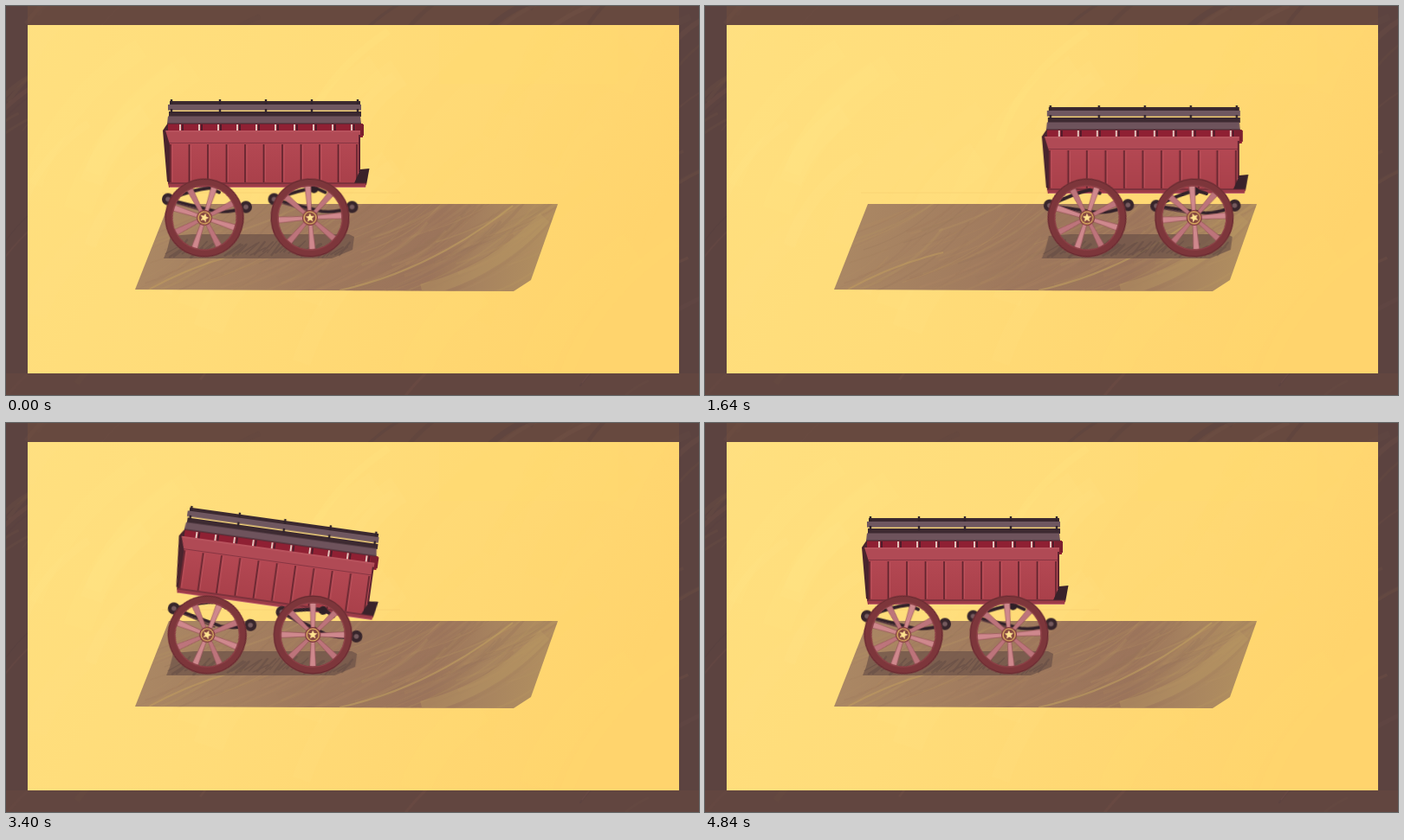
Recreate the animation shown at these times as an HTML page. Size 800 px wide and 450 px high, loop 4880 ms.

```html
<!DOCTYPE html>
<html lang="en">
<head>
<meta charset="utf-8">
<title>Wagon</title>
<style>
html, body { margin: 0; width: 100%; height: 100%; overflow: hidden; background: #ffdc78; }
svg { display: block; width: 100%; height: 100%; }

.ride, .roll, .tilt, .rear, .fore, .lag { animation: 4880ms ease-in-out infinite; }
.ride { --k: 1; animation-name: ride; }
.ride.front { --k: 1.008; }
.ride.low { --k: .975; }
.ride.top { --k: .98; }
.roll { animation-name: roll; }
.tilt { animation-name: tilt; transform-origin: 300px 320px; }
.rear { animation-name: rear; }
.fore { animation-name: fore; }
.lag { animation-name: lag; }

/* distance driven, scaled by --k */
@keyframes ride {
  0%, .5% { transform: translateX(0); animation-timing-function: cubic-bezier(.65,0,.35,1); }
  18.4%, 21% { transform: translateX(calc(var(--k) * 216px)); }
  33.6% { transform: translateX(calc(var(--k) * 212px)); }
  53.28% { transform: translateX(calc(var(--k) * 211px)); animation-timing-function: cubic-bezier(.65,0,.35,1); }
  73.36% { transform: translateX(calc(var(--k) * -4px)); }
  86%, 100% { transform: translateX(0); }
}
/* the same distance over a 45px radius */
@keyframes roll {
  0%, .5% { transform: rotate(0deg); animation-timing-function: cubic-bezier(.65,0,.35,1); }
  18.4%, 21% { transform: rotate(275deg); }
  33.6% { transform: rotate(270deg); }
  53.28% { transform: rotate(268.7deg); animation-timing-function: cubic-bezier(.65,0,.35,1); }
  73.36% { transform: rotate(-5deg); }
  86%, 100% { transform: rotate(0deg); }
}
@keyframes tilt {
  0%, .5% { transform: none; animation-timing-function: cubic-bezier(.45,0,.5,1); }
  11.48% { transform: translate(1px,0) rotate(-8.4deg); }
  20% { transform: translate(0,6px) rotate(3deg); }
  23% { transform: translate(0,7px) rotate(1.5deg); }
  28% { transform: translate(0,7px) rotate(-.7deg); }
  33.6%, 53.28% { transform: translate(0,7px) rotate(0deg); }
  68.65% { transform: translate(-5px,0) rotate(9.7deg); animation-timing-function: cubic-bezier(.3,.2,.5,1); }
  69.67% { transform: translate(-10px,1px) rotate(8deg); animation-timing-function: cubic-bezier(.3,.3,.5,1); }
  74.6% { transform: translate(0,0) rotate(-2.3deg); }
  79.5% { transform: translate(0,0) rotate(1deg); }
  84% { transform: translate(0,0) rotate(-.7deg); }
  88%, 100% { transform: none; }
}
@keyframes rear {
  0%, .5% { transform: none; }
  11.48% { transform: translate(-10px,4px) rotate(-34deg); }
  20% { transform: translate(2px,1px) rotate(-2deg); }
  33.6%, 53.28% { transform: translate(-1px,2.5px) rotate(-6deg); }
  69% { transform: translate(3px,-4px) rotate(7deg); }
  74.6% { transform: translate(-2px,1px) rotate(-7deg); }
  79.5% { transform: translate(1px,0) rotate(1deg); }
  86%, 100% { transform: none; }
}
@keyframes fore {
  0%, .5% { transform: none; }
  11.48% { transform: translate(-12px,-3.5px) rotate(-25deg); }
  20% { transform: translate(1px,4px) rotate(-1deg); }
  33.6%, 53.28% { transform: translate(-2px,3px) rotate(-6deg); }
  69% { transform: translate(4px,5px) rotate(13deg); }
  74.6% { transform: translate(-2px,-1px) rotate(-5deg); }
  79.5% { transform: translate(1px,0) rotate(1deg); }
  86%, 100% { transform: none; }
}
@keyframes lag {
  0%, .5%, 33.6%, 100% { transform: none; }
  11.48% { transform: translateX(-8px); }
  20% { transform: translateX(2px); }
}
</style>
</head>
<body>
<svg viewBox="0 0 800 450" preserveAspectRatio="none">
  <defs>
    <linearGradient id="wall" x2="1" y2=".35">
      <stop offset="0" stop-color="#ffe080"/><stop offset=".5" stop-color="#ffdc79"/><stop offset="1" stop-color="#ffd46d"/>
    </linearGradient>
    <linearGradient id="floor" gradientUnits="userSpaceOnUse" x1="160" y1="240" x2="630" y2="340">
      <stop offset="0" stop-color="#ab8864"/><stop offset=".4" stop-color="#9f795d"/>
      <stop offset=".7" stop-color="#9b745b"/><stop offset=".82" stop-color="#a7835f"/><stop offset="1" stop-color="#b39160"/>
    </linearGradient>
    <linearGradient id="side" x2="0" y2="1">
      <stop offset="0" stop-color="#b44853"/><stop offset="1" stop-color="#a9404a"/>
    </linearGradient>
    <clipPath id="ground"><path d="M188 229H637L606 317 586 330 149 328Z"/></clipPath>
    <clipPath id="border"><path d="M0 0H800V450H0ZM25 22V425H777V22Z" clip-rule="evenodd"/></clipPath>
    <g id="spring" fill="none" stroke="#33222a" stroke-width="4" stroke-linecap="round">
      <path d="M-45-4Q-16-15 3-17L14-12"/>
      <path d="M-38-2 10 10Q27 12 45 5" stroke-width="3.6"/>
      <path d="M-38 0 4 12" stroke="#58383f" stroke-width="1.5"/>
      <g fill="#37252b" stroke="none">
        <circle cx="-45" cy="-4" r="7"/><circle cx="45" cy="5" r="7"/>
        <g fill="#755a5e"><circle cx="-45" cy="-4" r="2.8"/><circle cx="45" cy="5" r="2.8"/></g>
      </g>
    </g>
    <g id="wheel">
      <g id="spokes" stroke="#8f4b53" stroke-width=".6"></g>
      <circle r="41" fill="none" stroke="#7d363b" stroke-width="9"/>
      <circle r="44.8" fill="none" stroke="#65282f" stroke-width="1"/>
      <circle r="37.3" fill="none" stroke="#93434a" stroke-width="1"/>
      <circle r="9" fill="#7d343b"/>
      <circle r="7" fill="#85463f" stroke="#deb163" stroke-width="1.3"/>
      <path id="star" fill="#ffe391"/>
    </g>
  </defs>

  <rect width="800" height="450" fill="url(#wall)"/>
  <g id="brush" fill="none"></g>
  <path d="M500 22H707V90H500Z" fill="#ffd970" opacity=".35"/>
  <path d="M180 216H455" stroke="#efc268" stroke-width=".8" opacity=".45"/>

  <g clip-path="url(#ground)">
    <path d="M140 220H650V335H140Z" fill="url(#floor)"/>
    <g id="grain" fill="none"></g>
  </g>

  <g clip-path="url(#border)">
    <path d="M0 0H800V450H0Z" fill="#67493f"/>
    <path d="M0 0H25V450H0ZM777 0H800V450H777Z" fill="#5c4340"/>
    <path d="M0 425H800V450H0Z" fill="#624640"/>
    <g id="wood" fill="none"></g>
  </g>

  <g class="ride low"><g class="lag">
    <path d="M190 266 215 264H396L402 267 400 282 376 292 182 292 186 282Z" fill="#6d5349" opacity=".72"/>
    <g id="hatch" stroke="#513e3c" stroke-linecap="round" fill="none" opacity=".3"></g>
  </g></g>

  <g class="ride top"><g class="tilt">
    <path d="M187 136H412V152H187Z" fill="#8f2033"/>
    <g id="slots"></g>
    <path d="M404 137H413V150H404Z" fill="#7b1f2f"/>
    <path d="M189 110H409V114.500H189Z" fill="#3b2930"/>
    <path d="M187 114H410V120.500H187Z" fill="#72596280"/>
    <path d="M187 114H410V120.500H187Z" fill="#6f5760"/>
    <path d="M188 122H410V128H188Z" fill="#3d2a31"/>
    <path d="M187 127.500H409L410 136H186Z" fill="#6e535c"/>
    <path d="M187 136H410" stroke="#412a32"/>
    <path id="posts" stroke="#32242b" stroke-width="2.400" fill="none"/>
    <path d="M187 157H408V206H187Z" fill="url(#side)"/>
    <g id="panels"></g>
    <path d="M183 144H409V158H184Z" fill="#b04a55"/>
    <path d="M184 145H409" stroke="#bf5b65" stroke-width="1"/>
    <path d="M184 158.500H408" stroke="#873542" stroke-width="1"/>
    <path d="M181 144 187 135V144H184L189 160V205L186 203Z" fill="#49242d"/>
    <path d="M408 149V192" stroke="#5f2430" stroke-width="2"/>
    <path d="M402 205 409 189 419.500 188 416 207Z" fill="#3a222a"/>
    <path d="M187 205H416L415 210H188Z" fill="#9d3c48"/>
    <path d="M187 205H416" stroke="#5b2731" stroke-width="1.200"/>
    <path d="M189 209.500H415" stroke="#c0656c" stroke-width="1"/>
  </g></g>

  <g class="ride"><g transform="translate(232 227.5)"><use href="#spring" class="rear"/></g></g>
  <g class="ride front"><g transform="translate(354.5 227.5)"><g class="fore"><use href="#spring"/><circle cx="1" cy="-16" r="5" fill="#2f2027"/></g></g></g>

  <g class="ride"><g transform="translate(229 245)"><g class="roll"><use href="#wheel" transform="rotate(-72)"/></g></g></g>
  <g class="ride front"><g transform="translate(351 245)"><g class="roll"><use href="#wheel" transform="rotate(-94)"/></g></g></g>
</svg>
<script>
const $ = id => document.getElementById(id);
let seed = 11;
const rnd = (a = 0, b = 1) => {
  seed = (seed * 16807) % 2147483647;
  return a + (b - a) * seed / 2147483647;
};
const pick = list => list[Math.floor(rnd(0, list.length))];
const fill = (id, n, make) => {
  $(id).innerHTML = Array.from({ length: n }, (_, i) => make(i)).join('');
};
const stroke = (d, color, width, alpha) =>
  `<path d="${d}" stroke="${color}" stroke-width="${width.toFixed(2)}" opacity="${alpha.toFixed(2)}"/>`;

// wide faint sweeps on the wall
fill('brush', 40, () => {
  const x = rnd(20, 760), y = rnd(60, 440), l = rnd(60, 170);
  return stroke(`M${x} ${y}q${l * .2} ${-l * .6} ${l * .8} ${-l}`, x < 400 ? '#ffe48c' : '#ffd56b', rnd(8, 40), rnd(.04, .13));
});

// dry brush arcs over the ground
fill('grain', 130, () => {
  const x = rnd(110, 600), l = rnd(60, 190), y = rnd(255, 345);
  return stroke(`M${x} ${y}q${l * .65} ${-l * .2} ${l} ${-l * .65}`,
    pick(['#b69560', '#b28c62', '#957259', '#9a745a']), rnd(.5, 4), rnd(.08, .3));
});
$('grain').innerHTML += stroke('M385 329Q490 306 585 231', '#c5a561', 2, .5)
  + stroke('M480 329Q560 310 622 245', '#b99961', 15, .4)
  + stroke('M165 328Q215 300 275 285', '#c3a05f', 2, .5);

fill('wood', 120, () => {
  const x = rnd(-60, 790), y = rnd(0, 470), l = rnd(30, 110);
  return stroke(`M${x} ${y}q${l * .4} ${-l * .55} ${l} ${-l * .8}`, pick(['#765449', '#533d3e', '#6e4f44']), rnd(1, 8), rnd(.12, .35));
});

fill('hatch', 42, i => {
  const x = 184 + i * 4.9;
  return `<path d="M${x} ${rnd(284, 291)}l${rnd(10, 18)} ${-rnd(8, 15)}" stroke-width="${rnd(1, 3)}"/>`;
});

fill('slots', 10, i => {
  const x = 201 + i * 22;
  return `<path d="M${x} 137v8" stroke="#ead5cb" stroke-width="1.800"/><path d="M${x + 3} 137v8" stroke="#4e1c2a" stroke-width="2"/>`;
});

$('posts').setAttribute('d', [191, 247, 300, 353, 406].map(x => `M${x} 108v6m0 5v5`).join(''));

fill('panels', 11, i => {
  const x = 190 + i * 21.500;
  return `<path d="M${x} 160V204" stroke="#63252f" stroke-width="1.700"/><path d="M${x + 2} 161V203" stroke="#c75c66" stroke-width="1" opacity=".6"/>`;
});

fill('spokes', 8, i => `<path d="M7-2 37-3.500V3.500L7 2Z" fill="${i % 2 ? '#bd747b' : '#cf888d'}" transform="rotate(${i * 45})"/>`);

$('star').setAttribute('d', 'M' + Array.from({ length: 10 }, (_, i) => {
  const r = i % 2 ? 2.400 : 5.500, a = i * Math.PI / 5;
  return `${(r * Math.cos(a)).toFixed(2)} ${(r * Math.sin(a)).toFixed(2)}`;
}).join('L') + 'Z');
</script>
</body>
</html>
```
